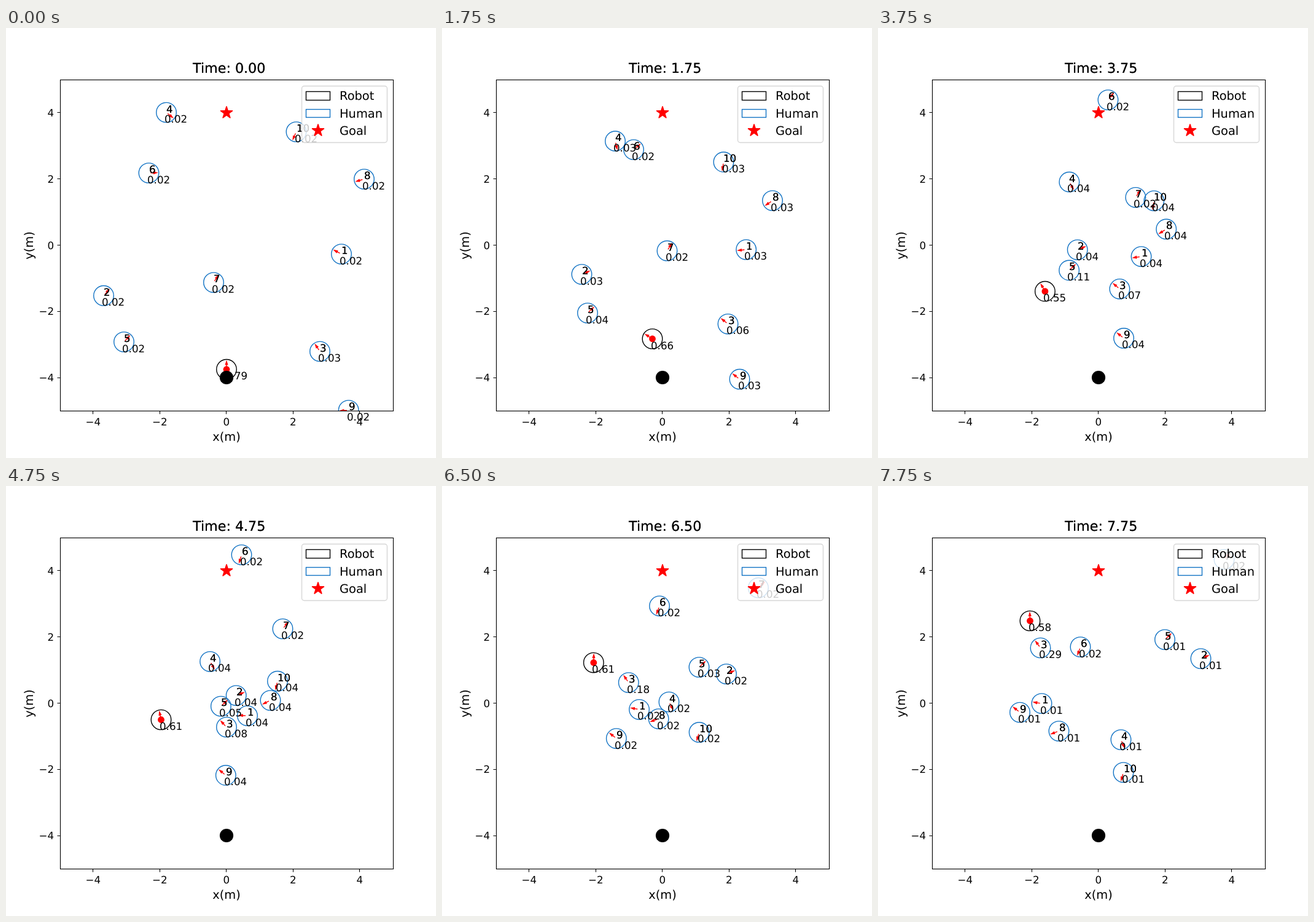
Write an HTML page that moves like this. It is 700x700 px and loops after 8 s.

```html
<!DOCTYPE html>
<html lang="en">
<head>
<meta charset="utf-8">
<title>Crowd navigation</title>
<style>
  html, body { margin: 0; width: 100%; height: 100%; overflow: hidden; background: #fff; }
  svg { display: block; width: 700px; height: 700px; }
  text { font: 16.67px "DejaVu Sans", sans-serif; text-rendering: geometricPrecision; white-space: pre; }
  .label { font-size: 19.44px; }
  .title { font-size: 22.22px; }
  .mid { text-anchor: middle; }
  .end { text-anchor: end; }
  .body, .key { fill: none; stroke: #1273c4; stroke-width: 1.39; }
  .robot { stroke: #000; }
  .arrow { fill: #f00; stroke: #f00; stroke-width: 1.39; }
  .star { fill: #f00; stroke: #f00; stroke-width: 1.39; stroke-linejoin: bevel; }
  .axis { fill: none; stroke: #000; stroke-width: 1.11; }
  .box { fill: #fff; stroke: #ccc; stroke-width: 1.39; opacity: .8; }
</style>
</head>
<body>
<svg viewBox="0 0 700 700">
  <clipPath id="plot"><rect x="88" y="84" width="542" height="539"/></clipPath>
  <g id="shapes" clip-path="url(#plot)"></g>
  <g id="marks"><circle cx="359" cy="569" r="11.1"/></g>
  <g id="axes">
    <rect class="axis" x="88.5" y="84.5" width="542" height="539"/>
    <text class="label mid" x="359" y="671.5">x(m)</text>
    <text class="label mid" transform="translate(44 354) rotate(-90)">y(m)</text>
  </g>
  <g id="texts"></g>
  <g id="legend">
    <rect class="box" x="481.5" y="94.5" width="139" height="92" rx="3.9"/>
    <rect class="key robot" x="488.5" y="103.5" width="39" height="14"/>
    <rect class="key" x="488.5" y="132.5" width="39" height="13"/>
    <text class="label" x="543" y="117">Robot</text>
    <text class="label" x="543" y="146">Human</text>
    <text class="label" x="543" y="174">Goal</text>
  </g>
</svg>
<script>
const STEP = 250, LOOP = 8000, METRE = 54;
const byId = id => document.getElementById(id);
const shapes = byId("shapes"), texts = byId("texts"), axes = byId("axes");

function add(parent, tag, attrs, content = "") {
  const el = document.createElementNS("http://www.w3.org/2000/svg", tag);
  for (const key in attrs) el.setAttribute(key, attrs[key]);
  el.textContent = content;
  parent.append(el);
  return el;
}

function star(parent, x, y) {
  const pts = Array.from({ length: 10 }, (_, i) => {
    const r = i % 2 ? 3.98 : 10.42, a = i * Math.PI / 5;
    return `${x + r * Math.sin(a)},${y - r * Math.cos(a)}`;
  });
  add(parent, "polygon", { class: "star", points: pts.join(" ") });
}

for (let v = -4; v <= 4; v += 2) {
  const x = 358.75 + v * 54.25, y = 353.5 - v * 53.9;
  const name = String(v).replace("-", "\u2212");
  const px = Math.floor(x) + .5, py = Math.floor(y) + .5;
  add(axes, "path", { class: "axis", d: `M${px} 623.5v5M88.5 ${py}h-5` });
  add(axes, "text", { class: "mid", x, y: 647 }, name);
  add(axes, "text", { class: "end", x: 78, y: Math.round(y + 6) }, name);
}
star(byId("marks"), 359, 138);
star(byId("legend"), 508, 167);

// Darker text comes from two overlaid copies
const twice = attrs => [0, 1].map(() => add(texts, "text", attrs));
const title = twice({ class: "title", x: 304, y: 73 });

const agents = [];
// heading: first direction in degrees; keys: [seconds, x, y];
// pull: attention drawn at close range; wave: swell of attention over the run
function agent(id, heading, keys, pull = 0, wave = .018) {
  const robot = !id, a = heading * Math.PI / 180, speed = robot ? 50 : 30;
  const slope = (p, q, axis) => (q[axis] - p[axis]) / (q[0] - p[0]);
  const last = keys.length - 1;
  const speeds = keys.map((_, i) => {
    if (!i) return [0, speed * Math.cos(a), speed * Math.sin(a)];
    const prev = keys[i - 1], next = keys[Math.min(i + 1, last)];
    return [0, slope(prev, next, 1), slope(prev, next, 2)];
  });
  const discs = [add(shapes, "ellipse", { class: robot ? "body robot" : "body", rx: 16.27, ry: 16.17 })];
  if (robot) discs.push(add(shapes, "circle", { r: 5.4, fill: "#f00" }));
  const arrow = add(shapes, "path", { class: "arrow", d: "M2.8 0H9M8 -1.6L13 0L8 1.6Z" });
  const names = robot ? [] : twice({});
  names.forEach(el => el.textContent = id);
  agents.push({ keys, speeds, pull, wave, discs, arrow, names, score: add(texts, "text", {}) });
}

agent(0, -90, [[0, 359, 555.7], [1, 372, 519], [1.75, 342.5, 506], [2.75, 301, 472.5],
  [4.75, 252.5, 380.5], [7.75, 247.5, 219.5]]);
agent(1, -152, [[0, 546, 368], [4.75, 393, 374], [7.75, 266.5, 354]]);
agent(2, -48, [[0, 159, 435.7], [1.75, 227.5, 401], [7.75, 525.5, 281]]);
agent(3, -124, [[0, 511, 526.5], [4.75, 359, 392.5], [7.75, 264.5, 263.5]], 1.1);
agent(4, 39, [[0, 261, 137.5], [2.75, 293, 217], [6.5, 369.5, 351.5], [7.75, 395.5, 413]]);
agent(5, -47, [[0, 192, 511], [1.75, 237, 464], [7.75, 467, 250]], .35);
agent(6, -2, [[0, 232.5, 236], [1.75, 312, 198], [3.75, 374.5, 117], [4.75, 383.5, 112],
  [7.75, 329.5, 262]], 0, 0);
agent(7, -57, [[0, 338, 414.3], [1.75, 366.5, 362.7], [4.75, 450.5, 232.5], [7.75, 563.5, 119.5]], 0, 0);
agent(8, 164, [[0, 583, 246], [1.75, 538, 281], [4.75, 430.5, 349], [7.75, 294.5, 399]]);
agent(9, 177, [[0, 557.7, 622.3], [1.75, 484.5, 571.7], [7.75, 231, 368.5]]);
agent(10, 114, [[0, 472.5, 169], [4.75, 442, 317.7], [7.75, 399.5, 466.3]]);

// Cubic Hermite position and velocity
function move(a, t) {
  let i = 0;
  while (i < a.keys.length - 2 && t >= a.keys[i + 1][0]) i++;
  const p = a.keys[i], q = a.keys[i + 1], h = q[0] - p[0], u = (t - p[0]) / h;
  const along = axis => {
    const d = q[axis] - p[axis], m = h * a.speeds[i][axis], n = h * a.speeds[i + 1][axis];
    const c2 = 3 * d - 2 * m - n, c3 = m + n - 2 * d;
    return [p[axis] + u * (m + u * (c2 + u * c3)), (m + u * (2 * c2 + 3 * u * c3)) / h];
  };
  [a.x, a.vx] = along(1);
  [a.y, a.vy] = along(2);
}

// Attention on a human: a slow swell plus a rise near the robot
function attention(a, robot, t) {
  const d = Math.hypot(a.x - robot.x, a.y - robot.y) / METRE;
  return .02 + a.wave * Math.sin(Math.PI * t / 7) + a.pull * Math.exp(-1.6 * d);
}

function place(el, x, y, turn = 0) {
  el.setAttribute("transform", `translate(${x} ${y}) rotate(${turn})`);
}

function draw(t) {
  title.forEach(el => el.textContent = "Time: " + t.toFixed(2));
  agents.forEach(a => move(a, t));
  const [robot, ...humans] = agents;
  humans.forEach(a => a.value = attention(a, robot, t));
  robot.value = 1 - humans.reduce((sum, a) => sum + a.value, 0);
  for (const a of agents) {
    a.discs.forEach(el => place(el, a.x, a.y));
    place(a.arrow, a.x, a.y, Math.atan2(a.vy, a.vx) * 180 / Math.PI);
    a.names.forEach(el => place(el, Math.round(a.x), Math.round(a.y)));
    place(a.score, Math.round(a.x - 2.9), Math.round(a.y + 16.5));
    a.score.textContent = a.value.toFixed(2);
  }
}

let shown = -1;
function tick() {
  const step = Math.floor(performance.now() % LOOP / STEP);
  if (step !== shown) draw((shown = step) * STEP / 1000);
  requestAnimationFrame(tick);
}
tick();
</script>
</body>
</html>
```
